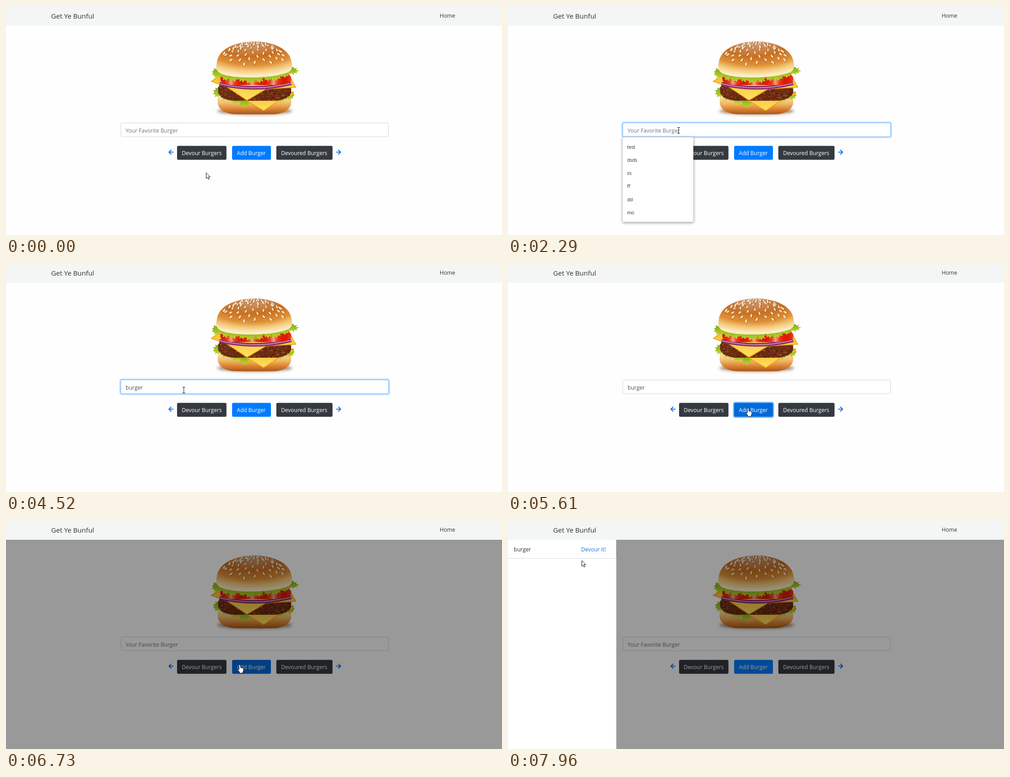
An HTML page for the animation above (8000 ms loop, 1099 px wide and 510 px high).

```html
<!DOCTYPE html>
<html lang="en">
<head>
<meta charset="utf-8">
<title>Burger list</title>
<style>
  html, body { margin: 0; width: 100%; height: 100%; overflow: hidden; background: #fefefe; }
  svg { display: block; }
  text { font: 12.1px "Open Sans", "Noto Sans", sans-serif; fill: #2d3136; white-space: pre; }
  .brand { font-size: 15.1px; }
  .label { fill: #fff; }
  .hint { fill: #6c757d; }
  .typed { fill: #495057; }
  .link { fill: #1f74e0; }
  #menu text { font-size: 10.3px; font-weight: 500; fill: #25282c; }
  #icons path { fill: none; stroke: #1673e6; stroke-width: 2; }
  .cheese { fill: url(#cheese); stroke: #f0a20f; stroke-width: 1.6; }
  .onion { fill: none; stroke: #8c2a68; stroke-width: 8; }
  .onion + .onion { stroke: #c990b4; stroke-width: 2; }
</style>
</head>
<body>
<svg width="1099" height="510" viewBox="0 0 1099 510">
  <defs>
    <radialGradient id="crown" cx=".47" cy="0" r="1">
      <stop offset="0" stop-color="#cfa18a"/><stop offset=".2" stop-color="#cb8a58"/>
      <stop offset=".42" stop-color="#c97022"/><stop offset=".66" stop-color="#df8f35"/>
      <stop offset=".8" stop-color="#f3c777"/><stop offset=".95" stop-color="#fdedc4"/>
    </radialGradient>
    <linearGradient id="heel" x2="0" y2="1">
      <stop offset=".35" stop-color="#fbe5b4"/><stop offset=".62" stop-color="#f0b766"/>
      <stop offset=".82" stop-color="#da812f"/><stop offset="1" stop-color="#a9571a"/>
    </linearGradient>
    <linearGradient id="cheese" x2="0" y2="1">
      <stop offset="0" stop-color="#f6b92a"/><stop offset="1" stop-color="#ffe165"/>
    </linearGradient>
    <linearGradient id="tomato" x2=".15" spreadMethod="reflect">
      <stop offset=".2" stop-color="#dc1a08"/><stop offset=".65" stop-color="#ee3a1c"/><stop offset="1" stop-color="#f8a184"/>
    </linearGradient>
    <linearGradient id="leafy" x2="0" y2="1">
      <stop offset="0" stop-color="#7da51a"/><stop offset="1" stop-color="#bddb2a"/>
    </linearGradient>
    <filter id="blur" x="-20%" y="-100%" width="140%" height="300%"><feGaussianBlur stdDeviation="3"/></filter>
    <clipPath id="meat"><rect x="470" y="165" width="162" height="46" rx="40" ry="20"/></clipPath>
    <clipPath id="drawerClip"><rect id="drawerBox" y="44" height="466"/></clipPath>
  </defs>

  <rect width="1099" height="44" fill="#f4f6f6"/>
  <text class="brand" x="100" y="28">Get Ye Bunful</text>
  <text x="961" y="26">Home</text>

  <g id="burger">
    <ellipse cx="551" cy="234" rx="83" ry="8" fill="#6f4a2c" opacity=".65" filter="url(#blur)"/>
    <rect x="469" y="180" width="163" height="61" rx="40" ry="26" fill="url(#heel)"/>
    <g id="lowLeaves"></g>
    <path class="cheese" d="M526 207L571 233L615 204L638 197L630 190Z"/>
    <g clip-path="url(#meat)"><rect x="468" y="164" width="166" height="50" fill="#6c2c12"/><g id="grain"></g></g>
    <path class="cheese" d="M455 168L480 150H625L642 181L576 185L534 210L489 180Z"/>
    <path class="onion" d="M473 173Q550 192 632 172"/><path class="onion" d="M473 173Q550 192 632 172"/>
    <rect x="475" y="148" width="157" height="28" rx="30" ry="12" fill="url(#tomato)"/>
    <g id="topLeaves"></g>
    <path d="M467 127C470 94 512 79 550 79C592 79 631 96 633 127C637 141 630 148 614 151C584 161 516 162 486 154C469 150 463 142 467 127Z" fill="url(#crown)"/>
    <g id="seeds"></g>
  </g>

  <rect id="ring" x="252.9" y="258.9" width="596.2" height="33.7" rx="4" fill="none" stroke="#007bff" stroke-opacity=".28" stroke-width="3"/>
  <rect id="field" x="254.5" y="260.5" width="593" height="30.5" rx="3" fill="#fff"/>
  <text id="hint" class="hint" x="265" y="281.5">Your Favorite Burger</text>
  <text id="typed" class="typed" x="265" y="281.5"></text>
  <rect id="caret" y="268.5" width="1" height="16" fill="#222"/>

  <g id="icons">
    <path id="back" d="M371 325.5H361.5M366.3 320.3L361 325.5L366.3 330.7"/>
    <use href="#back" transform="translate(1102.5) scale(-1 1)"/>
  </g>
  <rect id="glow" x="499.7" y="310.2" width="88.6" height="33.6" rx="4" fill="none" stroke="#007bff" stroke-opacity=".5" stroke-width="2.6"/>
  <g id="buttons"></g>
  <g id="menu">
    <rect x="254" y="293" width="157" height="190" rx="3" opacity=".4" filter="url(#blur)"/>
    <rect x="254" y="292" width="156.5" height="189" rx="2" fill="#fff" stroke="#d2d2d2" stroke-width=".6"/>
  </g>

  <rect id="shade" y="44" width="1099" height="466" opacity=".4"/>
  <g id="drawer" clip-path="url(#drawerClip)">
    <rect y="44" width="240" height="466" fill="#fff"/>
    <rect id="row" x="-9.5" y="43.5" height="42" rx="3" fill="#fff" stroke="#d8d8d8"/>
    <text id="rowName" y="70">burger</text>
    <text id="rowLink" class="link" y="70">Devour it!</text>
  </g>

  <g stroke="#111" stroke-linejoin="round" fill="#fff">
    <path id="arrow" d="M.5 .5V13L3.4 10.3L5.4 15L7.5 14L5.5 9.5H9.3Z"/>
    <path id="beam" d="M-3 -6.5H3M0 -6V6M-3 6.5H3"/>
    <path id="hand" d="M-1.6 11V1.6a1.6 1.6 0 0 1 3.2 0V7q1.4-1 2.4.4 1.6-.8 2.4.5 1.7-.4 1.8 1.4V13q0 2-1.5 3.5V19H-.5v-2L-4.4 11.5q-.4-2 1.4-1.7z"/>
  </g>
</svg>
<script>
const LOOP = 8000, CLICK_FIELD = 910, TYPE = 3110, CLICK_ADD = 5520, RELOAD = 6490, OPEN = 6725;
const $ = id => document.getElementById(id);
const show = (id, on) => $(id).setAttribute('visibility', on ? 'visible' : 'hidden');
const set = (id, attrs) => { for (const k in attrs) $(id).setAttribute(k, attrs[k]); };
const clamp = (v, lo, hi) => Math.min(hi, Math.max(lo, v));

let seed = 7;
const rnd = () => (seed = seed * 16807 % 2147483647) / 2147483647;
const repeat = (n, f) => Array.from({ length: n }, (_, i) => f(i)).join('');

// Ragged lettuce tuft
function leaf(cx, cy) {
  const rx = 11 + rnd() * 5, ry = 9 + rnd() * 4;
  const points = repeat(18, i => {
    const a = i / 9 * Math.PI, r = i % 2 ? .5 + rnd() * .25 : .85 + rnd() * .25;
    return `${cx + rx * r * Math.cos(a)},${cy + ry * r * Math.sin(a)} `;
  });
  return `<polygon points="${points}" fill="url(#leafy)"/>`;
}

$('lowLeaves').innerHTML = repeat(4, i => leaf(469 + i * 20, 192 + i * 8)) + repeat(2, i => leaf(626 - i * 20, 199 + i * 7));
$('topLeaves').innerHTML = repeat(10, i => leaf(468 + i * 18.5, 161 - 56 * (i / 9 - .45) ** 2));
$('grain').innerHTML = repeat(260, i =>
  `<ellipse cx="${470 + rnd() * 163}" cy="${176 + rnd() * 35}" rx="${.7 + rnd() * 1.6}" ry="${.6 + rnd()}"
    fill="${['#4a1a09', '#8f4824', '#a65a30', '#5a220d'][i % 4]}"/>`);

// Sesame seeds on a spiral, flattened onto the dome
$('seeds').innerHTML = repeat(64, i => {
  const r = Math.sqrt((i + .5) / 64), a = i * 2.4;
  const x = 549 + 70 * r * Math.cos(a), y = 84 + 28 * r * r + 20 * r * Math.sin(a);
  const turn = 90 - (x - 549) * .75 + (rnd() - .5) * 50, size = 2.3 + 1.9 * r;
  return `<g transform="translate(${x} ${y}) rotate(${turn})">
    <ellipse cx=".6" cy="-.5" rx="${size + .5}" ry="${size * .5 + .5}" fill="#934b16" opacity=".7"/>
    <ellipse rx="${size}" ry="${size * .48}" fill="#f6e3c0"/></g>`;
});

const buttons = [
  { x: 379, w: 109.5, label: 'Devour Burgers', fill: '#343a40', hover: '#23272b' },
  { x: 501, w: 86, label: 'Add Burger', fill: '#007bff', hover: '#0069d9' },
  { x: 599, w: 124.5, label: 'Devoured Burgers', fill: '#343a40', hover: '#23272b' }
];
$('buttons').innerHTML = buttons.map((b, i) =>
  `<rect id="button${i}" x="${b.x}" y="311.5" width="${b.w}" height="31" rx="3"/>
   <text class="label" x="${b.x + 10.5}" y="332">${b.label}</text>`).join('');
$('menu').innerHTML += ['test', 'dsds', 'ss', 'ff', 'dd', 'mo'].map((s, i) =>
  `<text x="264" y="${317.5 + i * 29.3}">${s}</text>`).join('');

// Pointer glides: start, end, destination
const glides = [
  [0, 740, 378, 277], [4519, 4520, 394, 283], [4520, 5070, 532, 323], [5850, 6340, 518, 322],
  [6810, 6890, 514, 322], [6950, 7270, 268, 239], [7270, 7800, 151, 96], [7800, 7960, 163, 90]
];

// The screen refreshes about every 75 ms
function pointer(t) {
  let x = 443, y = 371;
  for (const [a, b, toX, toY] of glides) {
    const p = t >= b ? 1 : clamp(Math.floor((t - a) / 75) * 75 / (b - a), 0, 1);
    const e = p * p * (3 - 2 * p);
    x += (toX - x) * e;
    y += (toY - y) * e;
  }
  return [Math.round(x), Math.round(y)];
}

// cubic-bezier(.25, .1, .25, 1)
function ease(p) {
  let lo = 0, hi = 1, u;
  for (let i = 0; i < 20; i++) {
    u = (lo + hi) / 2;
    if (.75 * u * (1 - u) + u ** 3 < p) lo = u; else hi = u;
  }
  return .3 * u * (1 - u) ** 2 + 3 * u * u * (1 - u) + u ** 3;
}

function typedText(t) {
  if (t < TYPE || t >= RELOAD) return '';
  return 'burger'.slice(0, 1 + (t >= 3190) + clamp(Math.floor((t - 3264) / 156), 0, 4));
}

function draw(t) {
  const [x, y] = pointer(t), text = typedText(t);
  const focus = t >= CLICK_FIELD && t < CLICK_ADD, open = t >= OPEN;

  show('ring', focus);
  set('field', { stroke: focus ? '#80bdff' : '#ced4da' });
  $('typed').textContent = text;
  show('hint', !text);
  const blink = Math.floor((t - (text ? 4005 : 735)) / 515);
  show('caret', focus && Math.max(0, blink) % 2 === 0);
  set('caret', { x: 265 + (text ? $('typed').getComputedTextLength() : 0) });
  show('menu', focus && t < TYPE);
  show('icons', t < RELOAD || open);
  show('glow', t >= CLICK_ADD && t < RELOAD);

  const over = b => y >= 311 && y <= 343 && x >= b.x && x <= b.x + b.w;
  buttons.forEach((b, i) => set('button' + i, { fill: t < OPEN + 80 && over(b) ? b.hover : b.fill }));

  const slide = Math.floor((t - OPEN) / 80) * 80 / 430;
  const w = slide > 0 ? 240 * ease(Math.min(1, slide)) : 0;
  show('shade', open);
  show('drawer', w > 0);
  set('drawerBox', { width: w });
  set('row', { width: w + 9 });
  set('rowName', { x: 13 - (240 - w) * .26 });
  set('rowLink', { x: w - 78 });

  const inField = x > 254 && x < 848 && y > 260 && y < 291;
  const kind = open ? (x < w ? 'arrow' : 'hand') : inField ? 'beam' : buttons.some(over) ? 'hand' : 'arrow';
  const hidden = t >= TYPE && t < 4520;
  for (const id of ['arrow', 'beam', 'hand']) show(id, id === kind && !hidden);
  set(kind, { transform: `translate(${x} ${y})` });
}

const start = performance.now();
function tick() {
  draw((performance.now() - start) % LOOP);
  requestAnimationFrame(tick);
}
tick();
</script>
</body>
</html>
```
